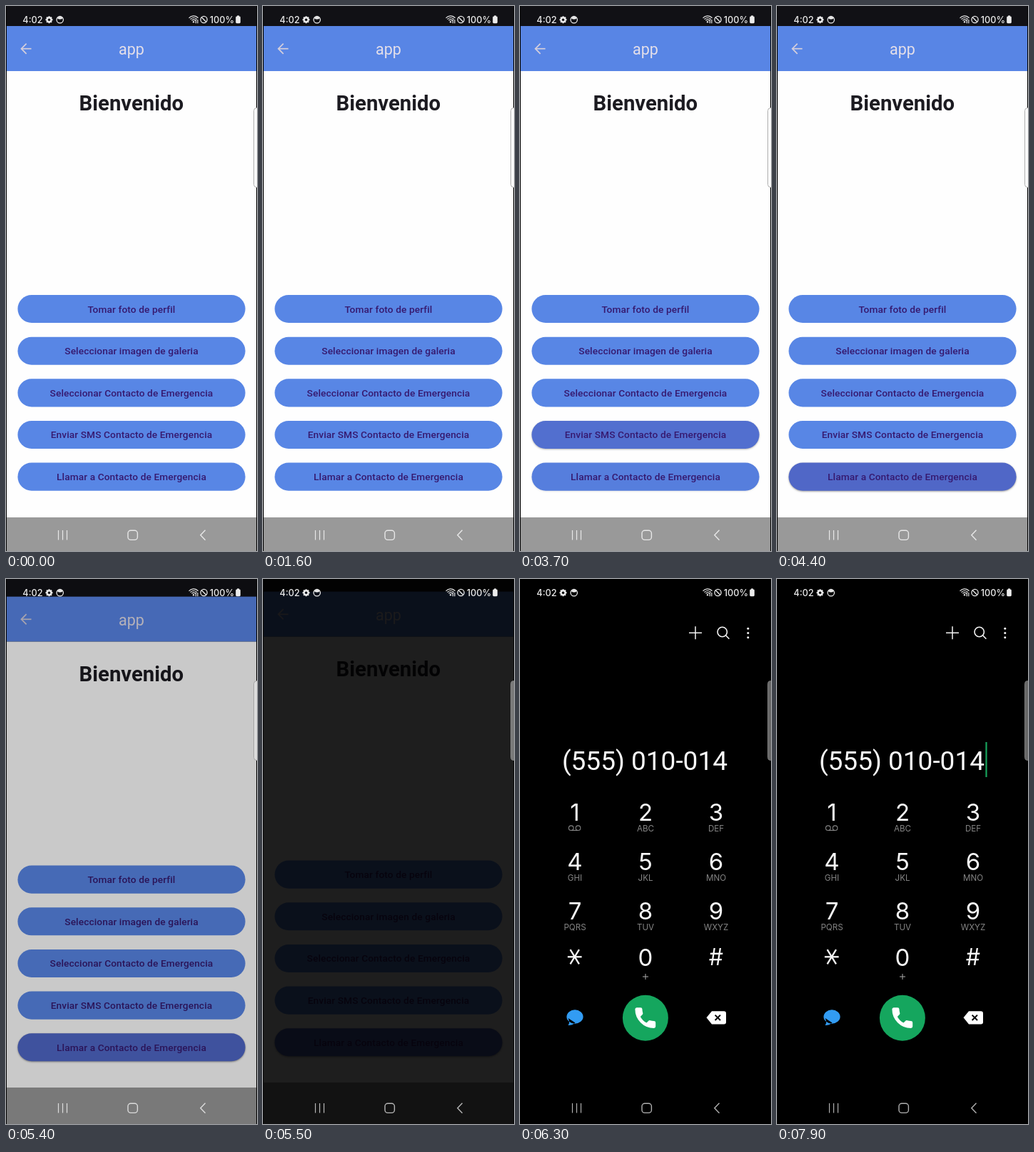
An HTML page with a canvas for the animation above (8000 ms loop, 352 px wide and 762 px high).

```html
<!DOCTYPE html>
<html lang="es">
<head>
<meta charset="utf-8">
<title>Bienvenido</title>
<style>
  html, body { margin: 0; width: 100%; height: 100%; overflow: hidden; background: #000; }
  canvas { display: block; width: 352px; height: 762px; }
</style>
</head>
<body>
<canvas id="stage"></canvas>
<script>
const W = 352, H = 762, LOOP = 8000;
const canvas = document.getElementById('stage');
const ratio = window.devicePixelRatio || 1;
canvas.width = W * ratio;
canvas.height = H * ratio;
const ctx = canvas.getContext('2d');

const ROBOTO = 'Roboto, sans-serif';
const INTER = 'Inter, sans-serif';
const BUTTONS = [
  'Tomar foto de perfil',
  'Seleccionar imagen de galeria',
  'Seleccionar Contacto de Emergencia',
  'Enviar SMS Contacto de Emergencia',
  'Llamar a Contacto de Emergencia'
];
const KEYS = [['1', ''], ['2', 'ABC'], ['3', 'DEF'], ['4', 'GHI'], ['5', 'JKL'], ['6', 'MNO'],
  ['7', 'PQRS'], ['8', 'TUV'], ['9', 'WXYZ']];
const COLUMNS = [77, 176, 275];
const HANDSET = new Path2D('M6.62 10.79c1.44 2.83 3.76 5.14 6.59 6.59l2.2-2.2c.27-.27.67-.36 1.02-.24' +
  ' 1.12.37 2.33.57 3.57.57.55 0 1 .45 1 1V20c0 .55-.45 1-1 1-9.39 0-17-7.61-17-17 0-.55.45-1 1-1h3.5' +
  'c.55 0 1 .45 1 1 0 1.25.2 2.45.57 3.57.11.35.03.74-.25 1.02z');

const ramp = (t, from, to) => Math.min(1, Math.max(0, (t - from) / (to - from)));
const mix = (a, b, k) => a + (b - a) * k;
const rgb = (a, b, k) => `rgb(${a.map((v, i) => Math.round(mix(v, b[i], k))).join()})`;
const grey = v => `rgb(${v},${v},${v})`;

function text(str, x, y, font, color, align = 'center', spacing = 0) {
  ctx.font = font;
  ctx.fillStyle = color;
  ctx.textAlign = align;
  ctx.letterSpacing = spacing + 'px';
  ctx.fillText(str, x, y);
}

function rect(x, y, w, h, color) {
  ctx.fillStyle = color;
  ctx.fillRect(x, y, w, h);
}

function rounded(x, y, w, h, r) {
  ctx.beginPath();
  ctx.roundRect(x, y, w, h, r);
}

function disc(x, y, r, color) {
  ctx.beginPath();
  ctx.arc(x, y, r, 0, 7);
  ctx.fillStyle = color;
  ctx.fill();
}

function ring(x, y, r, color, width, from = 0, to = Math.PI * 2) {
  ctx.beginPath();
  ctx.arc(x, y, r, from, to);
  ctx.strokeStyle = color;
  ctx.lineWidth = width;
  ctx.stroke();
}

function line(points, color, width) {
  ctx.beginPath();
  points.forEach(([x, y]) => ctx.lineTo(x, y));
  ctx.strokeStyle = color;
  ctx.lineWidth = width;
  ctx.stroke();
}

function drawButton(label, i, hover) {
  const y = 404 + i * 58.65;
  ctx.save();
  if (hover > 0) {
    ctx.shadowColor = `rgba(0,0,0,${0.4 * hover})`;
    ctx.shadowBlur = 2.5 * ratio;
    ctx.shadowOffsetY = ratio;
  }
  rounded(16.4, y, 319.2, 39.1, 19.55);
  ctx.fillStyle = rgb([88, 134, 229], [80, 103, 199], hover);
  ctx.fill();
  ctx.restore();
  text(label, 176, y + 24.5, '500 13.7px ' + ROBOTO, '#36196f', 'center', 0.1);
}

function drawApp(t) {
  rect(0, -20, W, 48, '#111115');
  rect(0, 28, W, 63, '#5885e5');
  rect(0, 91, W, 624, '#fefefe');
  rect(0, 715, W, 80, '#999');
  const arrow = '#d5cfdc';
  line([[35.5, 59.7], [21.5, 59.7]], arrow, 1.7);
  line([[28.6, 52.6], [21.5, 59.7], [28.6, 66.8]], arrow, 1.7);
  text('app', 176, 68, '400 21.5px ' + ROBOTO, '#e4dfe9');
  text('Bienvenido', 175.8, 146, '700 29.3px ' + ROBOTO, '#1c1b21');

  const toCall = ramp(t, 3650, 3850);
  const sms = ramp(t, 2400, 2600) * (1 - toCall);
  BUTTONS.forEach((label, i) => drawButton(label, i, i === 3 ? sms : i === 4 ? toCall : 0));
  rect(0, -20, 1, 820, '#000');
  rect(351, -20, 1, 820, '#000');
}

function drawStatus(dark) {
  const c = '#ececec';
  text('4:02', 23.3, 23.6, '500 12.7px ' + INTER, c, 'left');
  text('100%', 320, 23.6, '500 12.7px ' + INTER, c, 'right');
  // gear
  ring(60.5, 19.2, 3, c, 2.4);
  for (let i = 0; i < 8; i++) {
    const a = i * Math.PI / 4, x = Math.cos(a), y = Math.sin(a);
    line([[60.5 + 3.4 * x, 19.2 + 3.4 * y], [60.5 + 5 * x, 19.2 + 5 * y]], c, 2);
  }
  // round badge
  ring(75.7, 19.2, 4.7, c, 1.3);
  ctx.beginPath();
  ctx.ellipse(75.7, 16.8, 3.6, 1.8, 0, 0, 7);
  ctx.fillStyle = c;
  ctx.fill();
  // wifi
  [8.6, 6, 3.4].forEach(r => ring(263, 22.5, r, c, 1.2, -Math.PI * 0.77, -Math.PI * 0.23));
  disc(263, 22.3, 1.2, c);
  line([[266.3, 19], [266.3, 24.3]], c, 1.2);
  line([[268.8, 19], [268.8, 24.3]], c, 1.2);
  // blocked sign
  ring(277.5, 19, 4.6, c, 1.3);
  line([[274.3, 15.8], [280.7, 22.2]], c, 1.3);
  // battery
  rounded(322.2, 14.6, 6.6, 9.6, 1.4);
  ctx.fillStyle = c;
  ctx.fill();
  rect(324, 13.4, 3, 2, c);
  // edge handle
  rounded(347.5, 142.5, 9, 111, 4);
  ctx.fillStyle = grey(Math.round(mix(250, 104, dark)));
  ctx.fill();
  ctx.strokeStyle = grey(Math.round(mix(176, 120, dark)));
  ctx.lineWidth = 1;
  ctx.stroke();
}

function drawNav(dark) {
  const c = grey(Math.round(mix(232, 176, dark)));
  [73.5, 79.5, 85.5].forEach(x => line([[x, 733], [x, 746.5]], c, 1.2));
  rounded(171, 733.2, 13.4, 13.2, 4);
  ctx.strokeStyle = c;
  ctx.lineWidth = 1.4;
  ctx.stroke();
  line([[279.5, 732.8], [272.8, 739.8], [279.5, 746.8]], c, 1.4);
}

function drawKeypad() {
  const white = '#f8f8f8', dim = '#858585';
  KEYS.forEach(([digit, letters], i) => {
    const x = COLUMNS[i % 3], y = 338 + 69 * Math.floor(i / 3);
    text(digit, x, y, '400 33px ' + INTER, white);
    text(letters, x, y + 15, '400 11.6px ' + INTER, dim);
  });
  ring(71.7, 348.2, 3.3, dim, 1.1);
  ring(81.5, 348.2, 3.3, dim, 1.1);
  line([[71.7, 351.5], [81.5, 351.5]], dim, 1.1);

  line([[66.8, 528.3], [86.6, 528.3]], white, 2.3);
  line([[70.5, 518.2], [82.9, 538.4]], white, 2.3);
  line([[82.9, 518.2], [70.5, 538.4]], white, 2.3);
  text('0', 176, 541, '400 33px ' + INTER, white);
  text('#', 275, 540, '400 32px ' + INTER, white);
  line([[172, 556], [180, 556]], '#a0a0a0', 1.1);
  line([[176, 552], [176, 560]], '#a0a0a0', 1.1);
}

function drawActions() {
  // message bubble
  ctx.beginPath();
  ctx.ellipse(77, 612, 11.6, 9.7, 0, 0, 7);
  ctx.moveTo(67.5, 614);
  ctx.quadraticCurveTo(70.5, 620, 67.5, 624);
  ctx.quadraticCurveTo(73, 624.2, 77.5, 620.5);
  ctx.fillStyle = '#329cf3';
  ctx.fill();
  // call
  disc(175.9, 613.7, 32, '#15a65e');
  ctx.save();
  ctx.translate(175.8, 613.6);
  ctx.scale(1.5, 1.5);
  ctx.translate(-12, -12);
  ctx.fillStyle = ctx.strokeStyle = '#fff';
  ctx.lineWidth = 1.2;
  ctx.lineJoin = 'round';
  ctx.fill(HANDSET);
  ctx.stroke(HANDSET);
  ctx.restore();
  // backspace
  ctx.beginPath();
  ctx.moveTo(261.5, 613.3);
  ctx.lineTo(269, 604.2);
  ctx.lineTo(286, 604.2);
  ctx.quadraticCurveTo(289, 604.2, 289, 607.2);
  ctx.lineTo(289, 619.4);
  ctx.quadraticCurveTo(289, 622.4, 286, 622.4);
  ctx.lineTo(269, 622.4);
  ctx.closePath();
  ctx.fillStyle = '#fff';
  ctx.fill();
  line([[273.6, 609.6], [281, 617]], '#000', 2);
  line([[281, 609.6], [273.6, 617]], '#000', 2);
}

function drawDialer(t) {
  const white = '#f5f5f5';
  line([[237, 75.3], [255, 75.3]], white, 1.5);
  line([[246, 66.3], [246, 84.3]], white, 1.5);
  ring(283.7, 74, 6.7, white, 1.6);
  line([[288.5, 78.8], [293.4, 83.7]], white, 1.6);
  [69.3, 75.5, 81.7].forEach(y => disc(319.8, y, 1.5, white));

  text('(555) 010-014', 291, 267, '400 37px ' + ROBOTO, '#fafafa', 'right');
  drawKeypad();
  drawActions();
  // caret blinks every half second
  if (t >= 5800 && Math.floor((t - 5800) / 500) % 2 === 0) rect(292.4, 228, 2.2, 49, '#16a45c');
}

function draw(t) {
  ctx.setTransform(ratio, 0, 0, ratio, 0, 0);
  rect(0, 0, W, H, '#000');
  const leave = ramp(t, 5370, 5520);
  const dim = ramp(t, 5370, 5518.5);
  const enter = ramp(t, 5530, 5760);
  if (enter < 1) {
    ctx.save();
    ctx.translate(0, -10.6 * Math.sin(leave * Math.PI / 2));
    drawApp(t);
    ctx.restore();
    rect(0, 0, W, H, `rgba(0,0,0,${mix(dim, 1, ramp(t, 5500, 5600))})`);
  }
  if (enter > 0) {
    ctx.globalAlpha = enter;
    drawDialer(t);
    ctx.globalAlpha = 1;
  }
  drawStatus(dim);
  drawNav(dim);
}

function frame(now) {
  draw(now % LOOP);
  requestAnimationFrame(frame);
}
draw(0);
requestAnimationFrame(frame);
</script>
</body>
</html>
```
